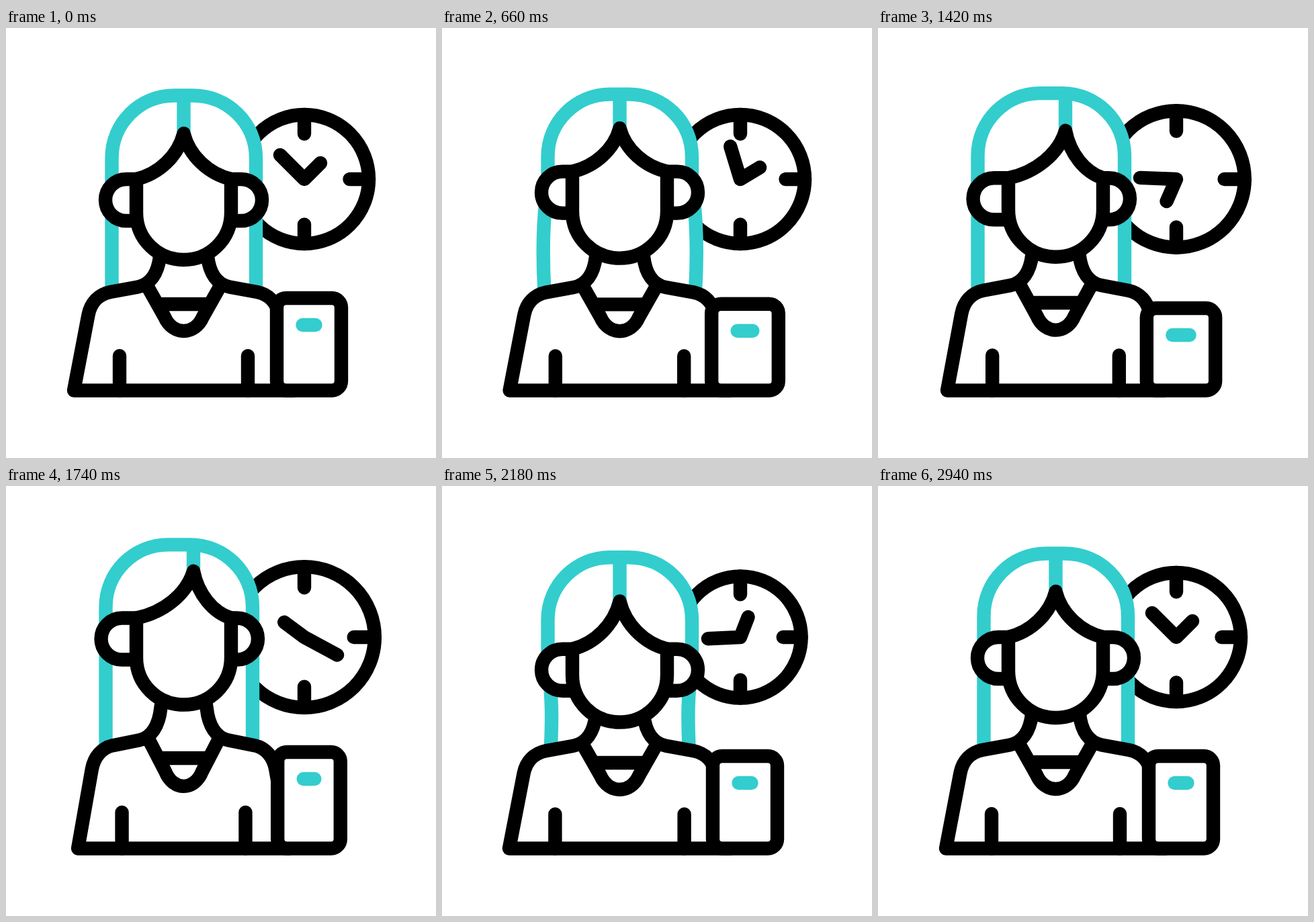
An HTML page that plays this animation: 640x640 px, repeating every 3.16 s.

```html
<!DOCTYPE html>
<html lang="en">
<head>
<meta charset="utf-8">
<title>Working hours</title>
<style>
  html, body { margin: 0; width: 100%; height: 100%; overflow: hidden; background: #fff; }
  svg { display: block; width: 100%; height: 100%; }
  path { fill: none; stroke: #000; stroke-width: 20.4; stroke-linecap: round; stroke-linejoin: round; }
  .solid { fill: #fff; }
  .teal { stroke: #33cdcd; }
  #hair, #part { stroke-linecap: butt; }
</style>
</head>
<body>
<svg viewBox="0 0 640 640">
  <path id="ring" class="solid"/>
  <path id="ticks"/>
  <path id="hands"/>
  <path id="hair" class="solid teal"/>
  <path id="shirt" class="solid"/>
  <path id="collar"/>
  <path id="ears" class="solid"/>
  <path id="part" class="teal"/>
  <path id="face" class="solid"/>
  <path id="phone" class="solid"/>
  <path id="button" class="teal"/>
</svg>
<script>
const LOOP = 3160, MID = 264.5, FLOOR = 539.5;

const unit = (t, a, b) => Math.min(1, Math.max(0, (t - a) / (b - a)));
const ramp = (t, a, b) => { const u = unit(t, a, b); return u * u * (3 - 2 * u); };
const bump = (t, at) => Math.exp(-(((t - at) / 150) ** 2));
const cubic = u => u < .5 ? 4 * u ** 3 : 1 - 4 * (1 - u) ** 3;

// Eased swing through turning points [time, value], starting from rest
const swing = (t, keys) => keys.slice(1).reduce(
  (v, [end, to], i) => v + (to - keys[i][1]) * ramp(t, keys[i][0], end), 0);

const nod = t => swing(t, [[220, 0], [500, -29], [970, 36], [1785, -29], [2025, 36], [2420, -17], [2920, 0]]);
const press = t => swing(t, [[220, 0], [560, 13], [980, -16.5], [1420, 15], [1740, -6], [2100, 0]]);

function wobble(t) {
  const u = unit(t, 1800, 2920);
  return .092 * ramp(t, 1000, 1700) * (1 - u) * Math.cos(10.4 * u);
}

// The body moves first, then the head, and the ears follow
function poseAt(t) {
  const head = nod(t + 40), lid = press(t);
  return {
    ear: nod(t),
    peak: 1.05 * nod(t + 20),
    crown: .55 * head + .0033 * head * head,
    chin: .67 * head,
    squash: .22 * nod(t + 65),
    turn: ramp(t, 700, 1060) - ramp(t, 1800, 2140),
    flare: 6 * bump(t, 660) - 5 * bump(t, 980) - 5 * bump(t, 2180),
    lid,
    wide: Math.max(-1.2, .21 * lid),
    scale: 1 + wobble(t),
    hour: 360 * cubic(unit(t, 50, 2910))
  };
}

const draw = (id, d) => document.getElementById(id).setAttribute('d', d);

function drawClock({ scale, hour }) {
  const r = 96 * scale, cx = 444, cy = 225;
  const polar = (deg, len) => {
    const a = deg * Math.PI / 180;
    return `${cx + Math.sin(a) * len * scale},${cy - Math.cos(a) * len * scale}`;
  };
  draw('ring', `M${cx - r},${cy}a${r},${r} 0 1 1 ${2 * r},0a${r},${r} 0 1 1 ${-2 * r},0Z`);
  draw('ticks', [0, 90, 180].map(a => `M${polar(a, 96)}L${polar(a, 67.5)}`).join(''));
  draw('hands', `M${polar(2 * hour - 45, 51)}L${cx},${cy}L${polar(hour + 45, 34)}`);
}

function drawHair({ turn, flare, crown, ear }) {
  const l = 157.5 - 9 * turn, r = 372 - 5 * turn;
  const top = 100.5 + crown, side = top + 93, c = top + 41, y = 246 + ear;
  draw('hair', `M${l - .85 * flare},392C${l - 1.3 * flare},345 ${l - 1.3 * flare},${y + 50} ${l},${y}V${side}`
    + `C${l},${c} ${l + 42},${top} ${250 - 9 * turn},${top}H${278 - 4 * turn}`
    + `C${r - 42},${top} ${r},${c} ${r},${side}V${y}`
    + `C${r + 1.3 * flare},${y + 50} ${r + 1.3 * flare},345 ${r + .85 * flare},392`);
}

function drawHead(p) {
  const px = MID + 14.5 * p.turn, py = 157 + p.peak;
  const l = 194, r = 335, j = 225 + p.ear, drop = j - py;
  const chin = 345 + p.chin, jaw = chin - 70;
  const near = x => `${px + (x - px) * .12},${py + drop * .49}`;
  const far = x => `${x + (px - x) * .48},${j - drop * .12}`;
  const ear = (x, tip, sweep) => `M${x},${j}H${tip}a31,31 0 0 ${sweep} 0,62H${x}`;

  draw('ears', ear(l, 179 - 6.5 * p.turn, 0) + ear(r, 350 - 6 * p.turn, 1));
  draw('part', `M${px},${100.5 + p.crown}V${py}`);
  draw('face', `M${l},${j}C${far(l)} ${near(l)} ${px},${py}C${near(r)} ${far(r)} ${r},${j}`
    + `V${jaw}C${r},${jaw + 40} ${MID + 38},${chin} ${MID},${chin}`
    + `C${MID - 38},${chin} ${l},${jaw + 40} ${l},${jaw}Z`);
}

function drawShirt({ squash }) {
  const sx = 1 + .0061 * squash, sy = 1 - .0077 * squash;
  const at = (x, y) => `${MID + (x - MID) * sx},${FLOOR + (y - FLOOR) * sy}`;
  const half = [[101, FLOOR], [122.5, 427], [126, 409], [138, 396.5], [155, 393],
    [196, 385.5], [214, 382], [226, 366], [229, 340], [233, 315]];
  const side = q => `${q[0]}L${q[1]}C${q[2]} ${q[3]} ${q[4]}L${q[5]}C${q[6]} ${q[7]} ${q[8]}L${q[9]}`;
  const left = half.map(([x, y]) => at(x, y));
  const right = half.map(([x, y]) => at(2 * MID - x, y)).reverse();
  const sleeve = x => `M${at(x, 488)}L${at(x, FLOOR)}`;
  draw('shirt', `M${side(left)}L${side(right)}Z`);
  draw('collar', `M${at(209, 382)}L${at(236, 430)}C${at(248, 458)} ${at(281, 458)} ${at(293, 430)}`
    + `L${at(320, 382)}M${at(226, 411)}L${at(303, 411)}` + sleeve(169) + sleeve(360));
}

function drawPhone({ lid, wide }) {
  const cx = 451, w = 48 + wide, top = 402 + lid, r = 14, b = 9.5 + wide;
  const corner = (dx, dy) => `a${r},${r} 0 0 1 ${dx * r},${dy * r}`;
  draw('phone', `M${cx - w + r},${top}H${cx + w - r}${corner(1, 1)}V${FLOOR - r}${corner(-1, 1)}`
    + `H${cx - w + r}${corner(-1, -1)}V${top + r}${corner(1, -1)}Z`);
  draw('button', `M${cx - b},${top + 40}H${cx + b}`);
}

const start = performance.now();

function frame() {
  const pose = poseAt((performance.now() - start) % LOOP);
  for (const paint of [drawClock, drawHair, drawShirt, drawHead, drawPhone]) paint(pose);
  requestAnimationFrame(frame);
}
frame();
</script>
</body>
</html>
```
